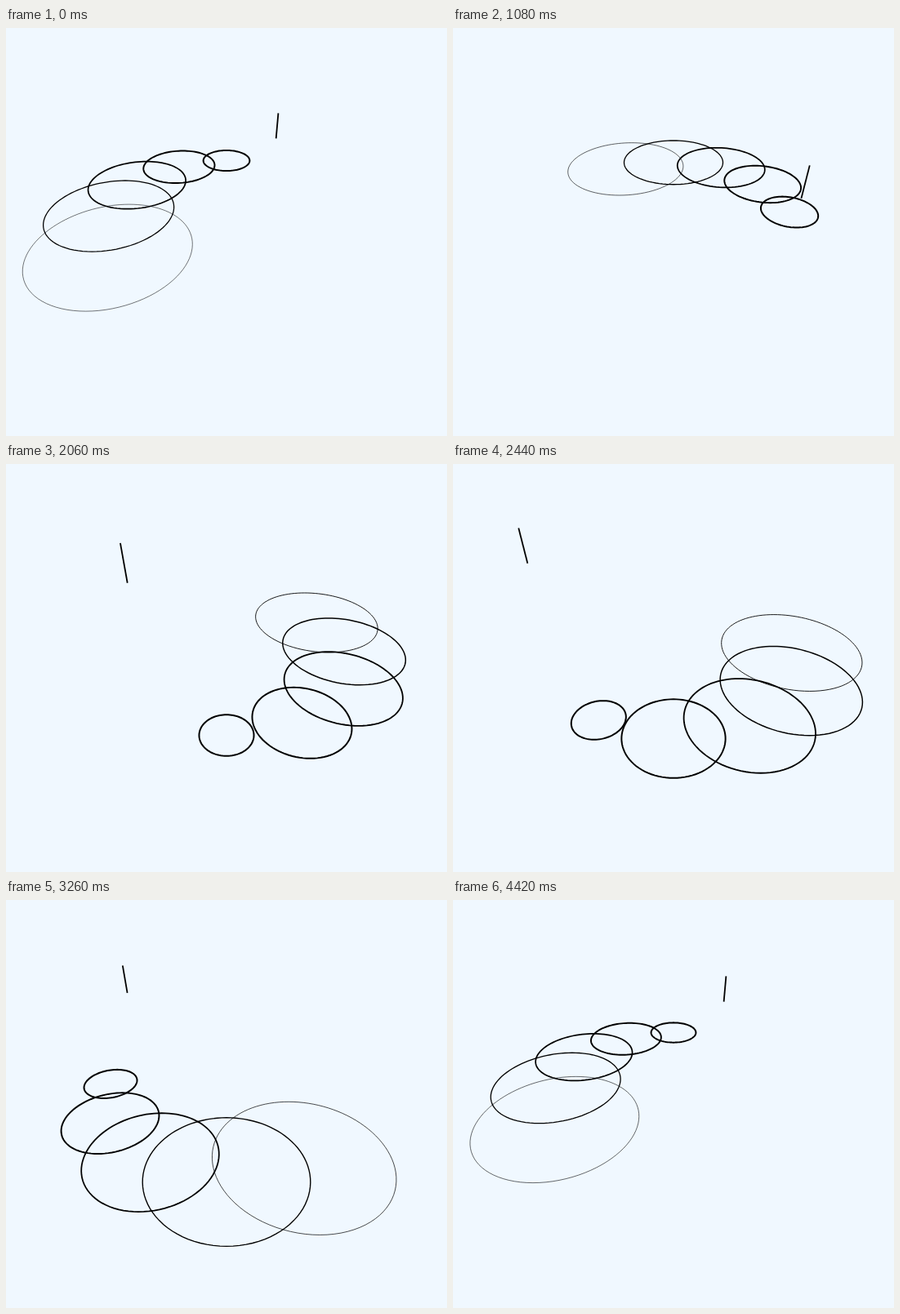
Write an HTML page that moves like this. It is 540 px wide and 500 px high and loops after 4440 ms.

```html
<!DOCTYPE html>
<html lang="en">
<head>
<meta charset="utf-8">
<title>Ripples</title>
<style>
  html, body { margin: 0; width: 100%; height: 100%; overflow: hidden; background: #f0f8ff; }
  svg { display: block; width: 540px; height: 500px; }
  path { fill: none; stroke: #000; }
</style>
</head>
<body>
<svg id="stage" viewBox="0 0 540 500"></svg>
<script>
const LOOP = 4440, STEP = 20, COUNT = 12, GAP = LOOP / COUNT;
const LEAD = 308;      // time since the first drop landed when the loop starts
const LIFE = 1985;     // how long a ripple lasts
const TRAIL = 57;      // streak length in ms of fall
const RADIUS = 141.5, FOCAL = 433, LIFT = -25.6;
const TILT = 0.6485, SIN = Math.sin(TILT), COS = Math.cos(TILT);

// Ground point (x, z) at a height, seen by a camera tilted down.
function project(x, z, height) {
  const depth = FOCAL + z * COS - height * SIN;
  const down = LIFT - z * SIN - height * COS;
  const px = 270 + FOCAL * x / depth, py = 250 + FOCAL * down / depth;
  return px.toFixed(2) + ' ' + py.toFixed(2);
}

function circle(x, z, r) {
  const pts = [];
  for (let i = 0; i < 96; i++) {
    const a = i / 96 * 2 * Math.PI;
    pts.push(project(x + r * Math.cos(a), z + r * Math.sin(a), 0));
  }
  return 'M' + pts.join('L') + 'Z';
}

// Height of a falling point, given the time left until it lands.
const fallHeight = left => left <= 0 ? 0 : 0.715 * left - 0.00044 * left * left;

function addPath(width) {
  const p = document.createElementNS('http://www.w3.org/2000/svg', 'path');
  p.setAttribute('stroke-width', width);
  document.getElementById('stage').appendChild(p);
  return p;
}

const drops = Array.from({ length: COUNT }, (_, k) => {
  const a = k / COUNT * 2 * Math.PI;
  return {
    x: RADIUS * Math.sin(a),
    z: RADIUS * Math.cos(a),
    birth: k * GAP - LEAD,
    ring: addPath(2),
    streak: addPath(1.8)
  };
});

function draw(t) {
  for (const { x, z, birth, ring, streak } of drops) {
    const age = (t - birth + LOOP) % LOOP;

    if (age < LIFE) {
      ring.setAttribute('d', circle(x, z, Math.sqrt(4.14 * age)));
      ring.setAttribute('stroke-width', 2 * (1 - (age / LIFE) ** 3));
    } else {
      ring.setAttribute('d', '');
    }

    const left = age < TRAIL ? -age : LOOP - age;
    streak.setAttribute('d', left < 700
      ? 'M' + project(x, z, fallHeight(left)) + 'L' + project(x, z, fallHeight(left + TRAIL))
      : '');
  }
}

const start = performance.now();
function tick() {
  const t = (performance.now() - start) % LOOP;
  draw(Math.floor(t / STEP) * STEP);
  requestAnimationFrame(tick);
}
tick();
</script>
</body>
</html>
```
